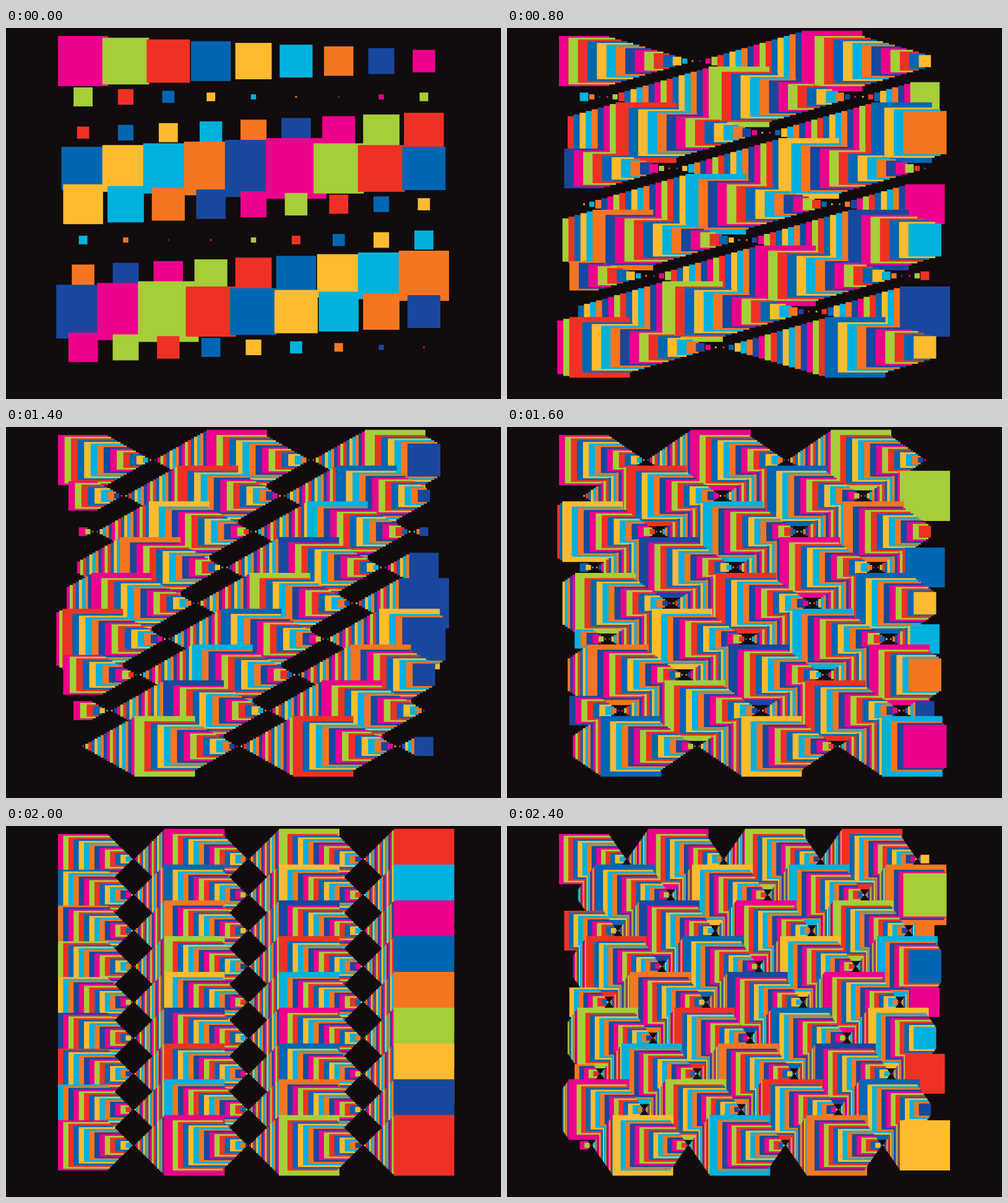
An HTML page with a canvas for the animation above (2600 ms loop, 800 by 600 pixels).

```html
<!DOCTYPE html>
<html lang="en">
<head>
<meta charset="utf-8">
<title>Square weave</title>
<style>
  html, body { margin: 0; width: 100%; height: 100%; overflow: hidden; background: #120c0e; }
  canvas { display: block; }
</style>
</head>
<body>
<canvas id="stage" width="800" height="600"></canvas>
<script>
const ctx = document.getElementById('stage').getContext('2d');

const BACK = '#120c0e';
const COLORS = ['#ed008c', '#a5ce39', '#ef3125', '#0066b3',
                '#fdbb30', '#00b1de', '#f47621', '#19479e'];
const STEP = 200, STEPS = 13, ROWS = 9;
const LEFT = 124.6, WIDTH = 550.8;
const TOP = 53.5, HEIGHT = 463;
const PERIOD = 33, PIVOT = 14.5, UNIT = 5.6;

// Sizes shrink to the pivot, grow past it, then start over.
const sizeOf = i => UNIT * Math.abs(i % PERIOD - PIVOT);

// Each step adds nine columns; size and colour run on from row to row.
function draw(step) {
  const cols = 9 * (step + 1);
  ctx.fillStyle = BACK;
  ctx.fillRect(0, 0, 800, 600);
  for (let i = 0; i < ROWS * cols; i++) {
    const x = LEFT + WIDTH * (i % cols) / (cols - 1);
    const y = TOP + HEIGHT * Math.floor(i / cols) / (ROWS - 1);
    const size = sizeOf(i);
    ctx.fillStyle = COLORS[i % COLORS.length];
    ctx.fillRect(x - size / 2, y - size / 2, size, size);
  }
}

let shown = -1;
function tick() {
  const step = Math.floor(performance.now() / STEP) % STEPS;
  if (step !== shown) draw(shown = step);
  requestAnimationFrame(tick);
}
tick();
</script>
</body>
</html>
```
